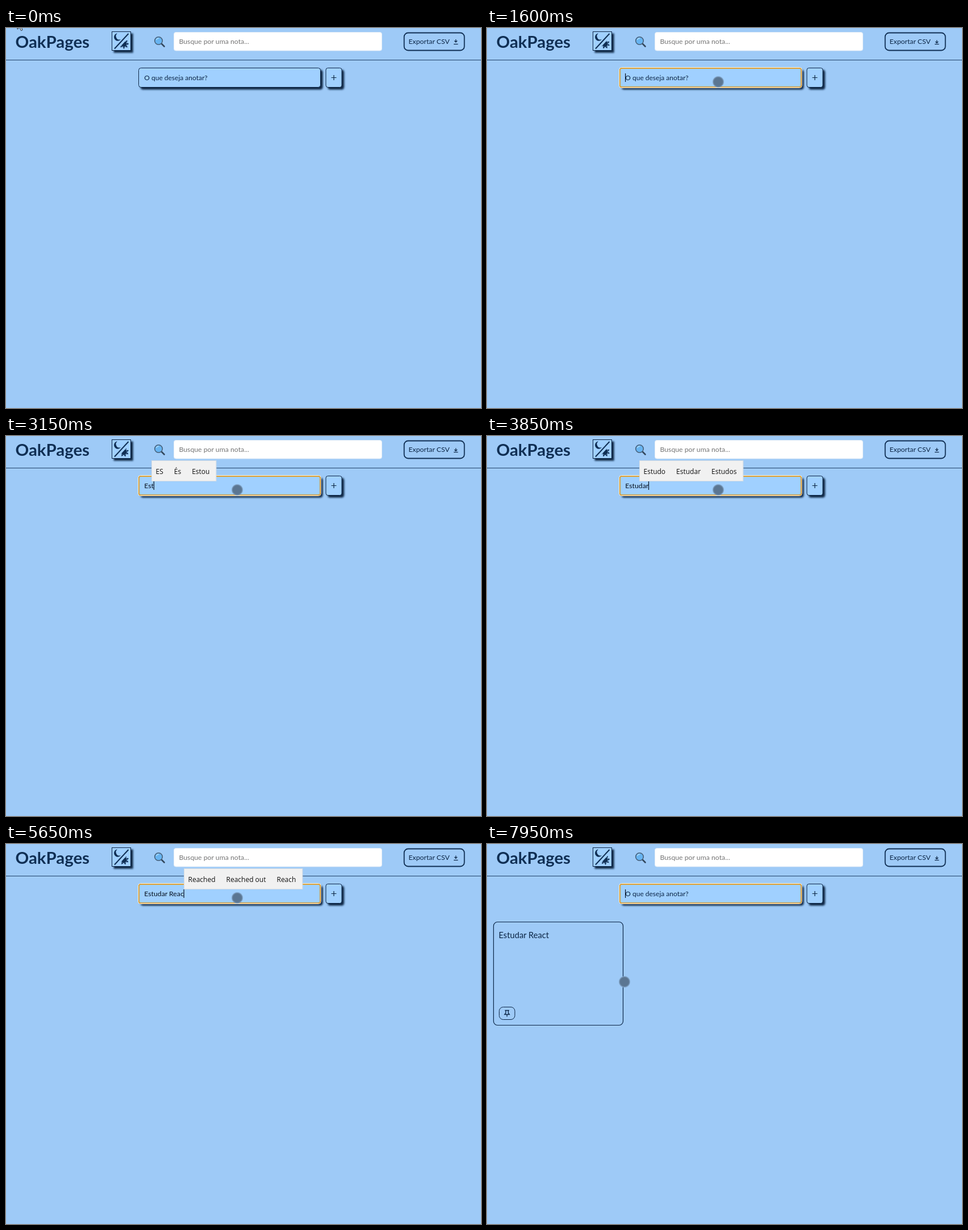
Recreate the animation shown at these times as an HTML page. Size 836 px wide and 670 px high, loop 8 s.

```html
<!DOCTYPE html>
<html lang="pt-BR">
<head>
<meta charset="utf-8">
<title>OakPages</title>
<style>
  html, body { margin: 0; width: 100%; height: 100%; overflow: hidden; background: #9ecaf7; }
  svg { display: block; width: 836px; height: 670px; }
  text { font: 12.25px Lato, sans-serif; fill: #0b2545; white-space: pre; }
  .title { font-size: 29.4px; font-weight: 700; fill: #102f54; }
  .box { fill: #a0d0ff; stroke: #0b2545; }
  .ink { fill: #102f54; }
  .line { fill: none; stroke: #0b2545; }
  .hint { font-size: 12px; }
  .typed { fill: #06111f; }
  .popup text { font: 12px "Open Sans", "Noto Sans", sans-serif; fill: #111; }
</style>
</head>
<body>
<svg viewBox="0 0 836 670">
  <defs>
    <filter id="shadow" x="-30%" y="-30%" width="160%" height="170%">
      <feDropShadow dx="3.6" dy="3.6" stdDeviation="1.85" flood-color="#0b2545"/>
    </filter>
    <clipPath id="sunSide"><path d="M194.500 40L219.500 13V40Z"/></clipPath>
    <radialGradient id="dotFill">
      <stop offset=".7" stop-color="#5b7692"/>
      <stop offset=".85" stop-color="#7392b2"/>
      <stop offset="1" stop-color="#8fb5de" stop-opacity=".4"/>
    </radialGradient>
  </defs>

  <text class="title" x="16.5" y="35">OakPages</text>
  <path d="M0 56.500H836" stroke="#17385d" stroke-width=".92"/>

  <g>
    <rect class="box" x="186.500" y="6.500" width="33" height="33" filter="url(#shadow)"/>
    <path class="ink" d="M196 9.500A6.600 6.600 0 1 0 202 20A6.100 6.100 0 0 1 196 9.500Z"/>
    <path d="M191 36.500L215.500 10" stroke="#102f54" stroke-width="2"/>
    <g clip-path="url(#sunSide)"><g id="sun" class="ink"></g></g>
  </g>

  <g>
    <path d="M273.500 27.500L278.500 32.500" stroke="#33485e" stroke-width="2.600" stroke-linecap="round"/>
    <circle cx="268.500" cy="22.500" r="6.800" fill="#67b4f1" stroke="#48617a" stroke-width="1.600"/>
    <path d="M264.500 21A4.500 4.500 0 0 1 269 18" fill="none" stroke="#a9d8fb" stroke-width="1.300"/>
  </g>
  <rect x="295.500" y="7.500" width="366" height="32.500" rx="3.500" fill="#fff" stroke="#dce9f6"/>
  <text x="304.500" y="28" style="fill:#757575">Busque por uma nota...</text>

  <rect class="line" x="700.700" y="8.500" width="106" height="31" rx="7" stroke-width="1.800" style="stroke:#102f54"/>
  <text x="708.500" y="28">Exportar CSV</text>
  <path class="line" d="M788 28.500H795.500" stroke-width="1.200"/>
  <path id="arrow" class="line" d="M791.700 21.500V26.500M789.200 24L791.700 26.500L794.200 24" stroke-width="1.200"/>

  <rect class="box" x="233.500" y="70.500" width="320" height="34" rx="4" filter="url(#shadow)"/>
  <g id="focus" fill="none">
    <rect x="232.700" y="69.700" width="321.600" height="35.800" rx="4" stroke="#fff"/>
    <rect x="234" y="71" width="319" height="33.200" rx="3" stroke="#e0a030" stroke-width="1.800"/>
  </g>
  <text id="entry" x="243.300" y="92"></text>
  <rect id="caret" y="80" width="1.200" height="15" fill="#06111f"/>
  <rect class="box" x="563" y="70.500" width="28" height="34" rx="3.500" filter="url(#shadow)"/>
  <path class="line" d="M572.500 87.500H581.500M577 83V92" stroke-width="1.200"/>

  <g id="card">
    <rect class="line" x="11.500" y="137.500" width="228" height="182" rx="7" stroke-width="1.200"/>
    <text x="20.500" y="166" style="font-size:14.700px">Estudar React</text>
    <rect class="line" x="21.500" y="287.500" width="27.500" height="22" rx="7"/>
    <path class="line" d="M31.500 293.500H39M33 293.500V298L31 300.500H39.500L37.500 298V293.500M35.200 300.500V304.500" stroke-width="1.300"/>
  </g>

  <g id="popup" class="popup"></g>

  <g id="pointer">
    <path id="arrowShape" d="M0 0V16L4 12.500L6.500 18.500L9 17.300L6.500 11.500H11.500Z" fill="#e4eaf0" stroke="#222f3c"/>
    <circle id="dotShape" r="10.500" fill="url(#dotFill)"/>
    <path id="moveShape" d="M0-7.500L3-4H1V-1H4V-3L7.500 0L4 3V1H1V4H3L0 7.500L-3 4H-1V1H-4V3L-7.500 0L-4-3V-1H-1V-4H-3Z"
      fill="#000" stroke="#fff" stroke-width="1.800" paint-order="stroke"/>
  </g>
</svg>
<script>
const LOOP = 8000, FOCUS = 1400, SUBMIT = 6650;
const $ = id => document.getElementById(id);
const show = (id, visible) => { $(id).style.display = visible ? '' : 'none'; };
const within = (t, from, to) => t >= from && t < to;

const entries = [
  [0, ''], [2650, 'E'], [2850, 'Es'], [3100, 'Est'], [3300, 'Estu'], [3480, 'Estud'],
  [3650, 'Estuda'], [3820, 'Estudar'], [4000, 'Estudar '], [4750, 'Estudar R'],
  [5000, 'Estudar Re'], [5250, 'Estudar Rea'], [5500, 'Estudar Reac'],
  [5750, 'Estudar React'], [SUBMIT, '']
];
// time, left edge, suggestions
const popups = [
  [0], [2700, 251, 'E', 'É', 'Eu'], [2920, 256, 'ES', 'És', 'Estou'],
  [3180, 261, 'Estou', 'Está', 'Este'], [3380, 268, 'Estudo', 'Estudar', 'Estudos'],
  [3900, 284, 'Estudar', 'Estudaram'], [4080, 287, 'e', 'a', 'o'],
  [4850, 296, 'R', 'Rua', 'Rio'], [5080, 302, 'Real', 'Rede', 'Rei'],
  [5320, 308, 'Real', 'Reais', 'Realmente'], [5570, 313, 'Reached', 'Reached out', 'Reach'], [5830]
];
const path = [[0, 19.5, -14], [400, 230, 60], [850, 399, 108], [1100, 407, 95], [7740, 407, 95], [7900, 242, 243]];

const current = (list, t) => list.findLast(item => item[0] <= t);

function pointAt(t) {
  const i = path.findLastIndex(p => p[0] <= t);
  const a = path[i], b = path[i + 1];
  if (!b) return a.slice(1);
  const k = (t - a[0]) / (b[0] - a[0]);
  return [1, 2].map(n => a[n] + (b[n] - a[n]) * k);
}

function addShape(parent, tag, attrs, content = '') {
  const node = document.createElementNS('http://www.w3.org/2000/svg', tag);
  for (const key in attrs) node.setAttribute(key, attrs[key]);
  node.textContent = content;
  parent.append(node);
  return node;
}

addShape($('sun'), 'circle', { cx: 207.5, cy: 28, r: 5.2 });
for (let i = 0; i < 8; i++) {
  addShape($('sun'), 'path', { d: 'M205.5 22.5L207.5 19L209.5 22.5Z', transform: `rotate(${i * 45} 207.5 28)` });
}

let shownPopup;
function drawPopup(popup) {
  if (popup === shownPopup) return;
  shownPopup = popup;
  const group = $('popup');
  group.replaceChildren();
  const [, left, ...words] = popup;
  if (!words.length) return;
  const back = addShape(group, 'rect', { x: left + .5, y: 43.5, height: 36, fill: '#f1f1f1', stroke: '#d4dbe2' });
  let x = left + 7.5;
  for (const word of words) {
    x += addShape(group, 'text', { x, y: 66.5 }, word).getComputedTextLength() + 19;
  }
  back.setAttribute('width', x - 8 - left);
}

function drawEntry(t) {
  const [since, text] = current(entries, t);
  const entry = $('entry');
  entry.textContent = text || 'O que deseja anotar?';
  entry.setAttribute('class', text ? 'typed' : 'hint');
  $('caret').setAttribute('x', 243 + (text ? entry.getComputedTextLength() : 0));
  show('focus', t >= FOCUS);
  show('caret', t >= FOCUS && (t - Math.max(since, FOCUS)) % 1000 < 500);
  show('card', t >= SUBMIT);
}

function drawPointer(t) {
  const moving = [2000, 4525, 7050].some(start => within(t, start, start + 100));
  $('pointer').setAttribute('transform', `translate(${pointAt(t)})`);
  show('arrowShape', t < 950);
  show('dotShape', t >= 950 && !moving);
  show('moveShape', moving);
}

function draw(now) {
  const t = now % LOOP;
  $('sun').setAttribute('transform', `rotate(${t * .18} 207.5 28)`);
  const lift = Math.max(0, ((t + 1475) % 1500 - 700) / 800);
  $('arrow').setAttribute('transform', `translate(0 ${-1.5 * Math.sqrt(lift)})`);
  drawEntry(t);
  drawPopup(current(popups, t));
  drawPointer(t);
  requestAnimationFrame(draw);
}
requestAnimationFrame(draw);
</script>
</body>
</html>
```
